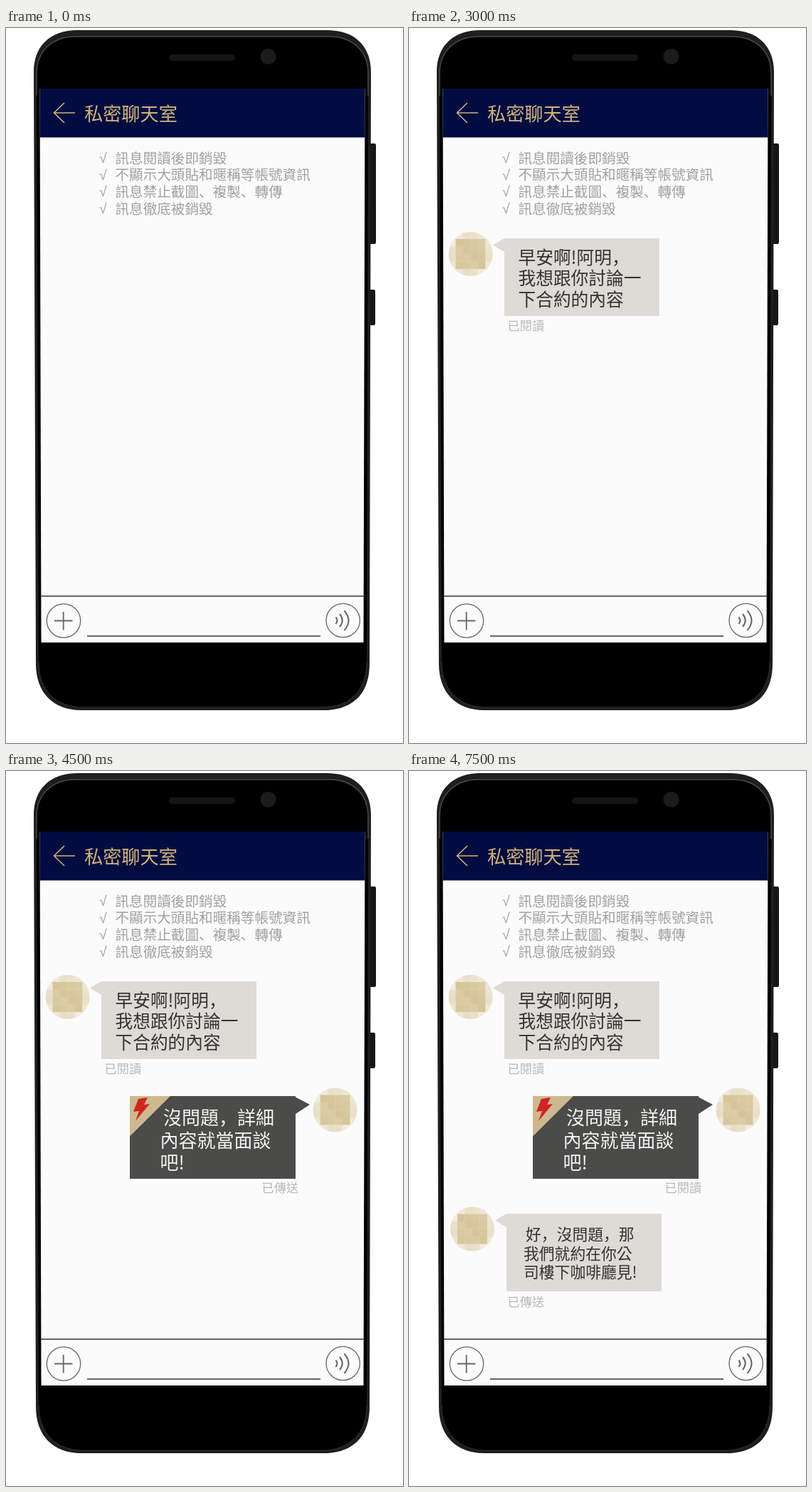
Write an HTML page that moves like this. It is 558 px wide and 1003 px high and loops after 8 s.

```html
<!DOCTYPE html>
<html lang="zh-Hant">
<head>
<meta charset="utf-8">
<title>私密聊天室</title>
<style>
  html, body { margin: 0; width: 100%; height: 100%; overflow: hidden; background: #fff; }
  svg { display: block; }
  text { font-family: "Noto Sans CJK TC", "Noto Sans CJK JP", sans-serif; white-space: pre; }
  .low { font-family: "Noto Sans CJK JP", sans-serif; }
  .tick { font-family: "Liberation Sans", sans-serif; }
  .line { fill: none; stroke: #666; }
</style>
</head>
<body>
<svg id="stage" width="558" height="1003" viewBox="0 0 558 1003">
  <defs>
    <clipPath id="disc"><circle r="31"/></clipPath>
  </defs>

  <g id="phone">
    <path d="M510 162h8q2 0 2 3v135q0 3-2 3h-8zM510 367h7q2 0 2 3v44q0 3-2 3h-7z" fill="#161616"/>
    <path d="M39 62C39 25 62 3 101 3H451C490 3 513 25 513 62L511 892C511 935 486 957 446 957H106C66 957 42 932 42 892Z" fill="#1e1e1e"/>
    <path d="M43 64C43 32 65 12 98 12H454C487 12 509 32 509 64L507 890C507 929 483 953 444 953H108C70 953 46 928 46 890Z" fill="#000"/>
    <path d="M43 95V64C43 32 65 12 98 12H454C487 12 509 32 509 64V95" fill="none" stroke="#4a4a4a" stroke-width="1.5"/>
    <path d="M46 890C46 928 70 953 108 953H444C483 953 507 929 507 890" fill="none" stroke="#303030"/>
    <rect x="229" y="37" width="93" height="9" rx="4.5" fill="#151515"/>
    <circle cx="368.500" cy="40" r="11" fill="#1b1b1b"/>
    <path d="M47.500 85H504.500L502.500 862H49.500Z" fill="#fbfbfb"/>
    <path d="M47.500 85H504.500V153.500H47.500Z" fill="#020c40"/>
    <path d="M97 119H67.500M82 105L67.500 119L82 133" fill="none" stroke="#d0b27a" stroke-width="1.600"/>
  </g>

  <g id="bar" class="line">
    <path d="M49 797H503" stroke-width="2"/>
    <path d="M114 853H442" stroke-width="2.200"/>
    <g stroke-width="1.300">
      <circle cx="81" cy="831.500" r="23.700"/>
      <circle cx="473.700" cy="831" r="23.700"/>
    </g>
    <path d="M68 831.500H93.500M80.700 819V844.500" stroke-width="1.800"/>
    <path d="M463.500 826.500Q467.500 831 463.500 836M469 822Q476.500 831 469 840M475.500 817.500Q487.500 831 475.500 845" stroke-width="2"/>
  </g>
</svg>

<script>
const LOOP = 8000;
const stage = document.getElementById("stage");

function add(parent, tag, attrs = {}) {
  const el = document.createElementNS("http://www.w3.org/2000/svg", tag);
  for (const key in attrs) el.setAttribute(key, attrs[key]);
  return parent.appendChild(el);
}

// Full-width commas sit at the lower left of their cell.
function label(parent, x, y, size, fill, content, weight = 400) {
  const el = add(parent, "text", { x, y, fill, "font-size": size, "font-weight": weight });
  for (const part of content.split(/([，、])/)) {
    const low = /[，、]/.test(part);
    add(el, "tspan", low ? { class: "low", lang: "ja" } : {}).textContent = part;
  }
  return el;
}

// A group visible only between two times of the loop.
function during(from, to = LOOP) {
  const group = add(stage, "g");
  const frames = [[0, 0], [from, 1], [to, 0]].map(([time, opacity]) =>
    ({ opacity, offset: time / LOOP, easing: "steps(1, end)" }));
  group.animate(frames, { duration: LOOP, iterations: Infinity });
  return group;
}

function avatar(parent, x, y) {
  const face = add(add(parent, "g", { transform: `translate(${x} ${y})` }), "g",
    { "clip-path": "url(#disc)" });
  const cell = 10.5;
  for (let row = 0; row < 6; row++) {
    for (let col = 0; col < 6; col++) {
      const ring = Math.max(Math.abs(col - 2.5), Math.abs(row - 2.5));
      const corner = Math.abs(col - 2.5) + Math.abs(row - 2.5) > 3.5;
      const light = (ring > 2 ? (corner ? 88 : 83) : 72) + (col * 5 + row * 3) % 4;
      add(face, "rect", {
        x: (col - 3) * cell, y: (row - 3) * cell, width: cell + 0.3, height: cell + 0.3,
        fill: `hsl(43 42% ${light}%)`
      });
    }
  }
}

function greyBubble(parent, x, y) {
  add(parent, "path", { d: `M${x} ${y}h218v109h-218v-90l-16 -9.500z`, fill: "#dedad5" });
}

function status(x, y, from, read) {
  label(during(from, read), x, y, 17.2, "#b8b8b8", "已傳送");
  if (read < LOOP) label(during(read), x, y, 17.2, "#b8b8b8", "已閱讀");
}

label(stage, 110, 129.5, 26.2, "#d0b27a", "私密聊天室");
["訊息閱讀後即銷毀", "不顯示大頭貼和暱稱等帳號資訊", "訊息禁止截圖、複製、轉傳", "訊息徹底被銷毀"]
  .forEach((rule, i) => {
    const y = 189.5 + i * 23.7;
    label(stage, 131, y - 0.5, 19.6, "#a0a0a0", "√").setAttribute("class", "tick");
    label(stage, 153.5, y, 19.6, "#a0a0a0", rule);
  });

const hello = during(1500);
avatar(hello, 86.5, 317);
greyBubble(hello, 134, 295);
["早安啊!阿明，", "我想跟你討論一", "下合約的內容"].forEach((line, i) =>
  label(hello, 153.5, 330.5 + i * 29.7, 24.7, "#333", line));
status(138.5, 424, 1500, 3000);

const reply = during(4500);
avatar(reply, 462.5, 475.5);
add(reply, "path", { d: "M174 456H407V457.500L427 468L407 481V572H174Z", fill: "#4b4b49" });
add(reply, "path", { d: "M174 456H231L174 512.500Z", fill: "#cdb98f" });
add(reply, "path", { d: "M186 460L199 458L194 468L202 467L182 491L187 477L179 478Z", fill: "#d1251f" });
[[221, "沒問題，詳細"], [216.5, "內容就當面談"], [216.5, "吧!"]].forEach(([x, line], i) =>
  label(reply, x, 496 + i * 31.5, 26, "#f4f4f4", line));
status(359.5, 591, 4500, 6000);

const agree = during(7500);
avatar(agree, 89, 642.5);
greyBubble(agree, 137, 621);
[[164, "好，沒問題，那"], [161, "我們就約在你公"], [161, "司樓下咖啡廳見!"]].forEach(([x, line], i) =>
  label(agree, x, 658 + i * 26.5, 21.8, "#333", line));
status(138.5, 751, 7500, LOOP);
</script>
</body>
</html>
```
